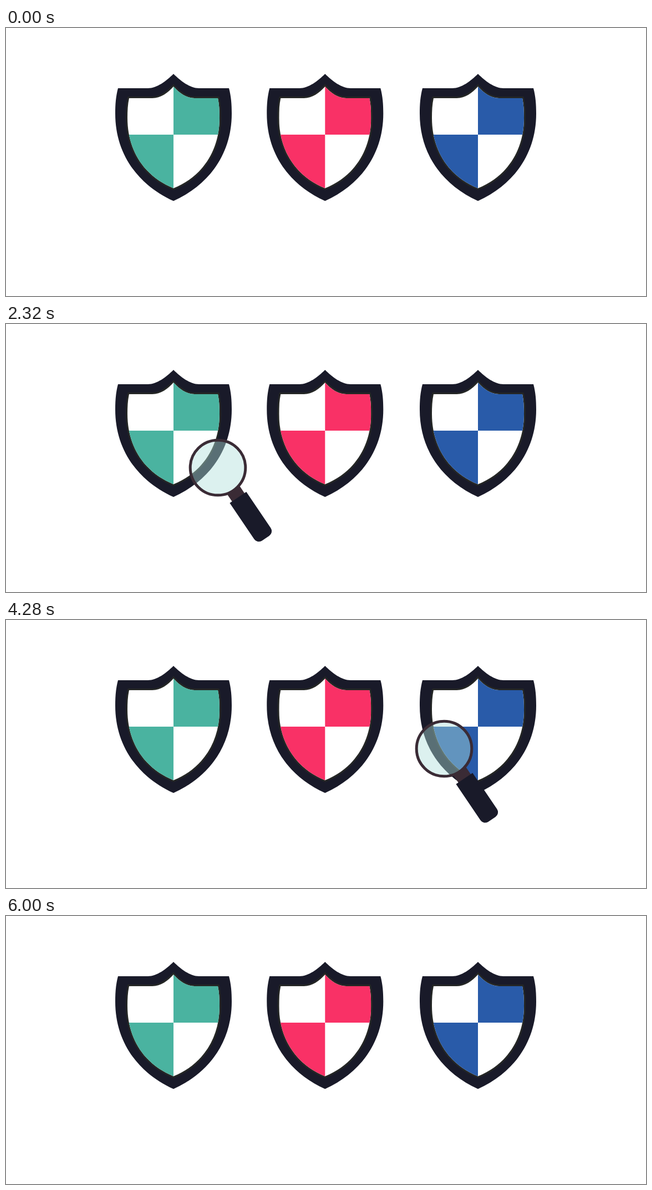
Recreate the animation shown at these times as an HTML page. Size 1154x485 px, loop 6320 ms.

```html
<!DOCTYPE html>
<html lang="en">
<head>
<meta charset="utf-8">
<title>Shields and magnifier</title>
<style>
  html, body { margin: 0; width: 100%; height: 100%; overflow: hidden; background: #fff; }
  svg { display: block; width: 100%; height: 100%; }
</style>
</head>
<body>
<svg viewBox="0 0 1154 485">
  <defs>
    <path id="outer" d="M0 83C-13 96 -30 109 -46 109H-100C-104 124 -105 138 -105 155C-105 228 -64 284 0 313
      C64 284 105 228 105 155C105 138 104 124 100 109H46C30 109 13 96 0 83Z"/>
    <path id="inner" d="M0 106C-10 117 -23 127 -38 127H-80C-82.5 138 -83 150 -83 163C-83 222 -52 269 0 290
      C52 269 83 222 83 163C83 150 82.5 138 80 127H38C23 127 10 117 0 106Z"/>
    <clipPath id="field"><use href="#inner"/></clipPath>
    <g id="shield">
      <use href="#outer" fill="#191a29"/>
      <use href="#inner" fill="#fff" stroke="#242625" stroke-width="6"/>
      <g clip-path="url(#field)">
        <path fill="#fff" d="M-90 100H90V300H-90Z"/>
        <path fill="currentColor" d="M0 100H90V193H-90V300H0Z"/>
      </g>
    </g>
  </defs>
  <use href="#shield" x="302" color="#4ab3a0"/>
  <use href="#shield" x="575.3" color="#f93166"/>
  <use href="#shield" x="851" color="#295ba9"/>
  <g id="magnifier" visibility="hidden">
    <g transform="rotate(-34)">
      <path fill="#3a2b35" d="M-13 50H14V67H-13Z"/>
      <path fill="#191a29" d="M-18 65H18V144A10 10 0 0 1 8 154H-8A10 10 0 0 1 -18 144Z"/>
    </g>
    <circle r="48" fill="rgb(174,222,218)" fill-opacity=".432"/>
    <circle r="49.8" fill="none" stroke="#3a2b35" stroke-width="5"/>
  </g>
</svg>
<script>
const LOOP = 6320, STEP = 40, START = 400, END = 6000;

// Lens centre along its path: [ms, x, y]
const keys = [
  [400, -92, 339], [1000, 33, 217], [1380, 136.5, 181], [1640, 208, 188],
  [2320, 382, 260], [2540, 435, 267], [2920, 516, 225.5], [3220, 574.5, 183],
  [3480, 623, 208], [3560, 637, 215], [3920, 710, 263], [4280, 790, 233],
  [4660, 879, 178], [4840, 921, 183], [5280, 1026, 205], [5480, 1073, 214.5],
  [6000, 1208, 240]
];

const slope = (i, axis) => (keys[i + 1][axis] - keys[i][axis]) / (keys[i + 1][0] - keys[i][0]);

// Weighted slope at a key; flat where the direction turns
function tangent(i, axis) {
  if (i === 0) return slope(0, axis);
  if (i === keys.length - 1) return slope(i - 1, axis);
  const before = slope(i - 1, axis), after = slope(i, axis);
  if (before * after <= 0) return 0;
  const left = keys[i][0] - keys[i - 1][0], right = keys[i + 1][0] - keys[i][0];
  return (before * right + after * left) / (left + right);
}

// Cubic Hermite interpolation between neighbouring keys
function position(t, axis) {
  let i = 0;
  while (i < keys.length - 2 && t >= keys[i + 1][0]) i++;
  const span = keys[i + 1][0] - keys[i][0];
  const s = (t - keys[i][0]) / span;
  const blend = s * s * (3 - 2 * s);
  return keys[i][axis] * (1 - blend) + keys[i + 1][axis] * blend
    + span * s * (1 - s) * (tangent(i, axis) * (1 - s) - tangent(i + 1, axis) * s);
}

const magnifier = document.getElementById('magnifier');

function draw() {
  const t = Math.floor(performance.now() % LOOP / STEP) * STEP;
  const visible = t >= START && t < END;
  magnifier.setAttribute('visibility', visible ? 'visible' : 'hidden');
  if (visible) magnifier.setAttribute('transform', `translate(${position(t, 1)} ${position(t, 2)})`);
  requestAnimationFrame(draw);
}
draw();
</script>
</body>
</html>
```
